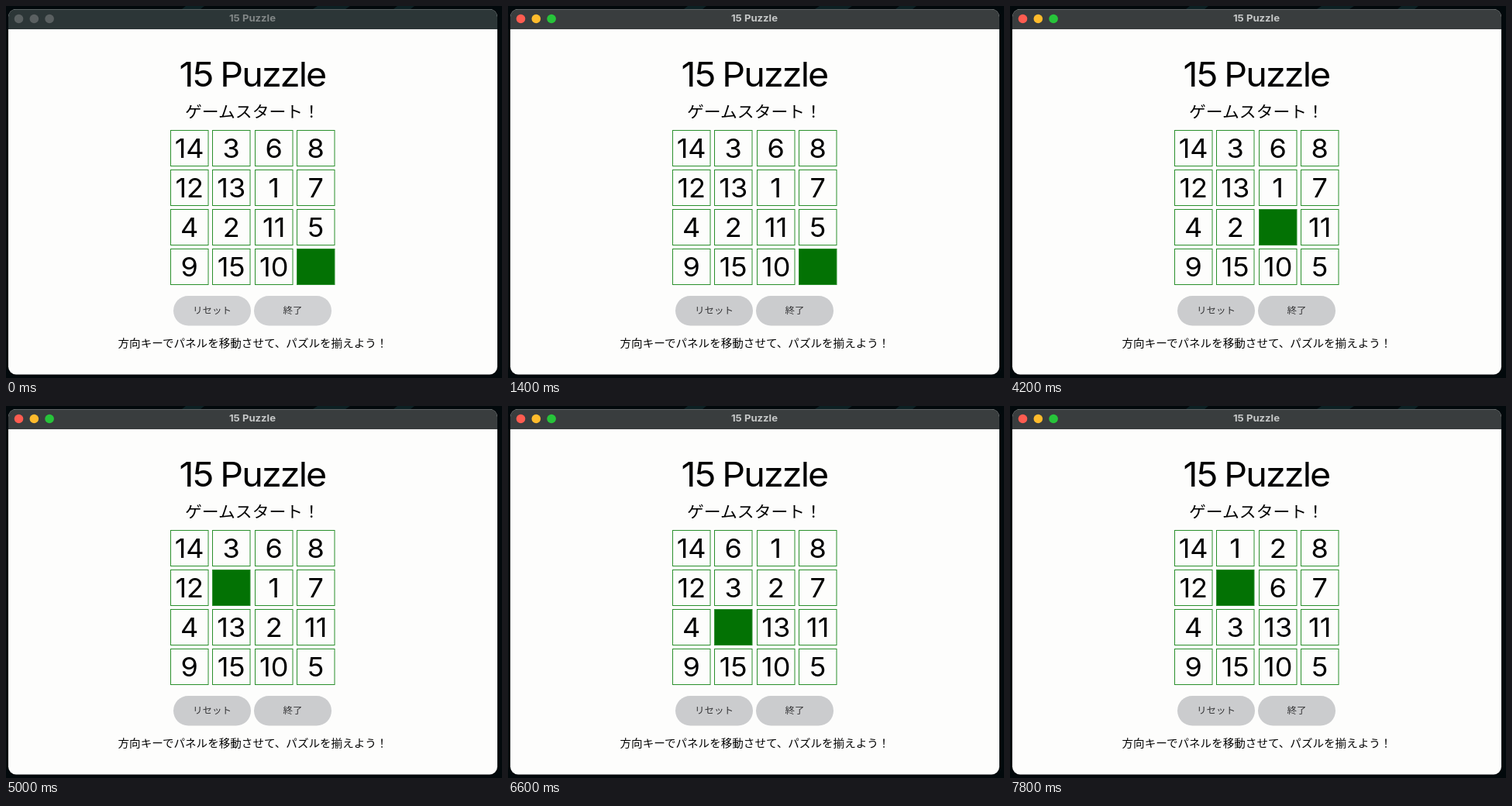
These frames come from a looping animation (640x480 px, 8 s). An HTML page:

```html
<!DOCTYPE html>
<html lang="ja">
<head>
<meta charset="utf-8">
<title>15 Puzzle</title>
<style>
html, body { margin: 0; width: 100%; height: 100%; overflow: hidden; background: #02090c; }
svg { display: block; width: 100%; height: 100%; }
/* The whole screen is slightly wider than its natural aspect */
text {
  text-anchor: middle; font-family: Inter, "Noto Sans CJK JP", "Noto Sans CJK", sans-serif;
  transform: scaleX(1.06); transform-box: fill-box; transform-origin: center;
}
.ja { font-family: "Noto Sans CJK JP", "Noto Sans CJK", sans-serif; }
.cell { stroke: #2a8f2c; stroke-width: 1; }
.num { font-size: 34px; }
.title { font-size: 44px; letter-spacing: -.04em; word-spacing: -.03em; }
</style>
</head>
<body>
<svg viewBox="0 0 640 480">
  <defs>
    <clipPath id="win"><rect x="3" y="4" width="631" height="471.5" rx="10"/></clipPath>
  </defs>
  <rect width="640" height="480" fill="#02090c"/>
  <path d="M232 0h24l-5 4h-24zM402 0h42l-6 4h-42zM505 0h22l-5 4h-22z" fill="#0c2023"/>
  <g clip-path="url(#win)">
    <rect x="3" y="4" width="631" height="472" fill="#fdfdfc"/>
    <rect id="bar" x="3" y="4" width="631" height="26"/>
    <path d="M10 4.5H627" stroke="#7b7f80" stroke-opacity=".6"/>
  </g>
  <g id="lights"></g>
  <text id="caption" x="318" y="20.5" font-size="12.4" font-weight="700">15 Puzzle</text>
  <text class="title" x="318" y="104.5">15 Puzzle</text>
  <text class="ja" x="318" y="144.5" font-size="20.6">ゲームスタート！</text>
  <g id="board"></g>
  <g id="buttons"></g>
  <text class="ja" x="318.5" y="440.3" font-size="13.75">方向キーでパネルを移動させて、パズルを揃えよう！</text>
</svg>
<script>
const LOOP = 8000, FOCUS_AT = 600;
const START = [14, 3, 6, 8, 12, 13, 1, 7, 4, 2, 11, 5, 9, 15, 10, 0];
const STEP = { U: -4, D: 4, L: -1, R: 1 };
// Direction in which the gap travels, and when each step happens
const PATH = "ULLUURDDLUURDL";
const TIMES = [3400, 3800, 4400, 4800, 5200, 5600, 6000, 6200, 6400, 6800, 7000, 7200, 7400, 7600];
const LIGHTS = ["#ff5c50", "#febb2c", "#27c43a"];

const $ = id => document.getElementById(id);
function add(parent, tag, attrs, text) {
  const el = document.createElementNS("http://www.w3.org/2000/svg", tag);
  for (const k in attrs) el.setAttribute(k, attrs[k]);
  if (text) el.textContent = text;
  return parent.appendChild(el);
}

const lights = LIGHTS.map((c, i) => add($("lights"), "circle", { cx: 16.5 + 19.8 * i, cy: 16.5, r: 5.8 }));

const cells = START.map((n, i) => {
  const x = Math.round(212 + (i % 4) * 54.3) + 0.5, y = 160.5 + (i >> 2) * 51;
  return {
    box: add($("board"), "rect", { class: "cell", x, y, width: 48.5, height: 46 }),
    num: add($("board"), "text", { class: "num", x: x + 24.2, y: y + 35.5 })
  };
});

const pills = [["リセット", 266], ["終了", 370]].map(([label, x]) => {
  const pill = add($("buttons"), "rect", { x: x - 50, y: 374, width: 100, height: 38.5, rx: 19.2 });
  add($("buttons"), "text", { class: "ja", x, y: 397.3, "font-size": 11.8, fill: "#333335" }, label);
  return pill;
});

function boardAt(t) {
  const b = START.slice();
  let gap = b.indexOf(0);
  for (let i = 0; i < PATH.length && t >= TIMES[i]; i++) {
    const next = gap + STEP[PATH[i]];
    b[gap] = b[next];
    b[next] = 0;
    gap = next;
  }
  return b;
}

function render(t) {
  const active = t >= FOCUS_AT;
  $("bar").setAttribute("fill", active ? "#393d3e" : "#2c3637");
  $("caption").setAttribute("fill", active ? "#c6c8c8" : "#828787");
  lights.forEach((el, i) => el.setAttribute("fill", active ? LIGHTS[i] : "#5a6061"));
  pills.forEach(el => el.setAttribute("fill", active ? "#cbccce" : "#d0d1d3"));
  boardAt(t).forEach((n, i) => {
    cells[i].box.setAttribute("fill", n ? "#fdfdfc" : "#037204");
    cells[i].num.textContent = n || "";
  });
}

const t0 = performance.now();
function tick() {
  render((performance.now() - t0) % LOOP);
  requestAnimationFrame(tick);
}
tick();
</script>
</body>
</html>
```
